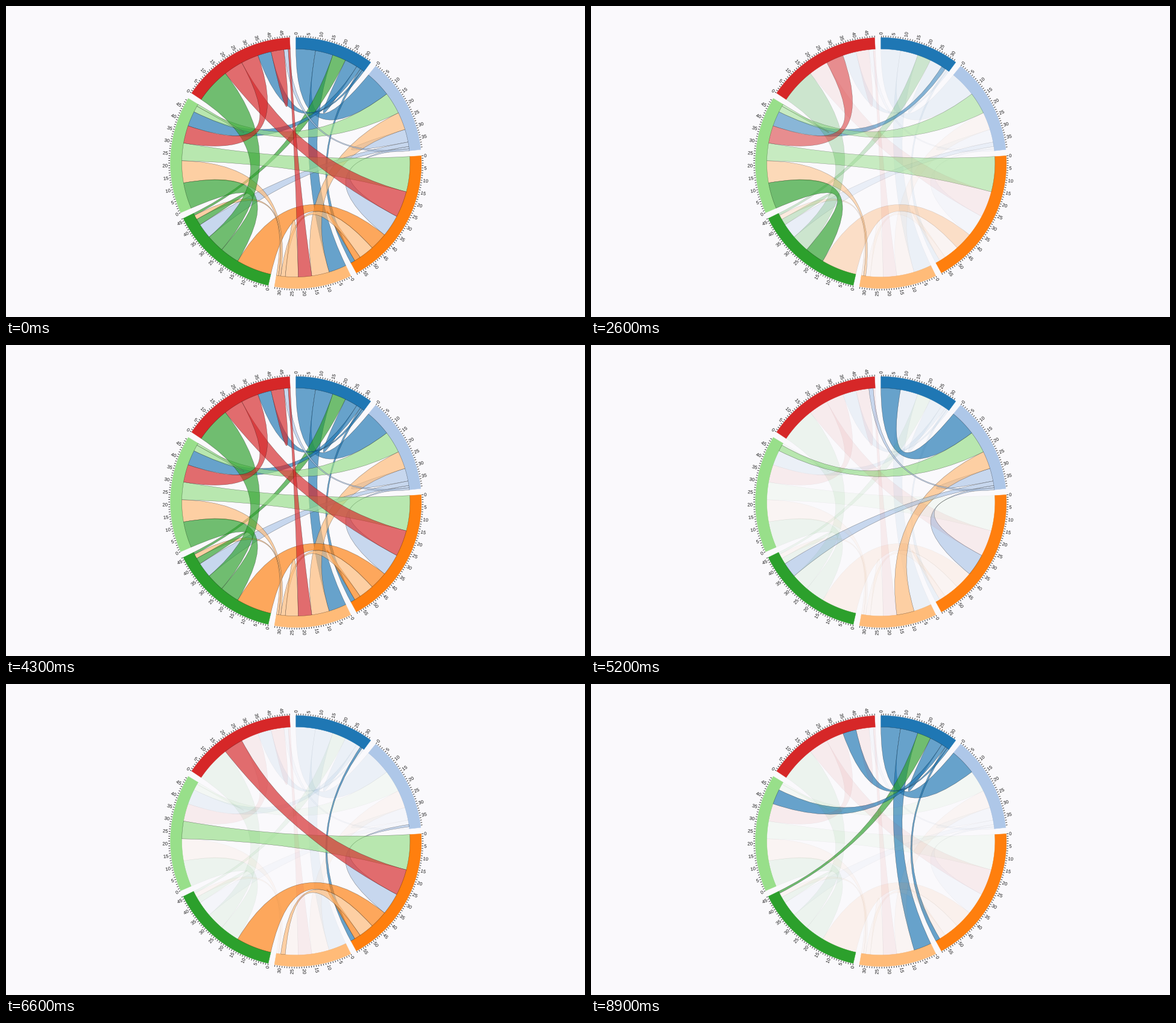
These frames come from a looping animation (960x516 px, 9000 ms). A matplotlib script:

```python
import numpy as np
import matplotlib.pyplot as plt
from matplotlib.animation import FuncAnimation
from matplotlib.collections import LineCollection
from matplotlib.colors import to_rgba
from matplotlib.patches import PathPatch, Polygon
from matplotlib.path import Path
from matplotlib.textpath import TextPath
from matplotlib.transforms import Affine2D

WIDTH, HEIGHT, DPI = 960, 516, 100
PX = 72 / DPI
CENTER = np.array([480.7, 260.5])
INNER = 189.2
OUTER = INNER * 1.1
PADDING = np.degrees(0.05)
FRAMES, INTERVAL = 90, 100
FADED, FADE_MS = 0.1, 250
FONT_SIZE = 7.8
BACKGROUND = "#faf9fc"

COLORS = ["#1f77b4", "#aec7e8", "#ff7f0e", "#ffbb78",
          "#2ca02c", "#98df8a", "#d62728"]

# Flow from each group (row) to each group (column), in thousands.
FLOWS = np.array([
    [5.87, 8.92, 1.01, 8.05, 6.17, 1.95, 0.99],
    [11.98, 5.87, 1.01, 8.09, 2.06, 10.05, 0.94],
    [2.06, 10.05, 2.87, 6.91, 8.09, 16.15, 11.98],
    [8.09, 8.05, 2.06, 5.87, 0.99, 1.01, 6.17],
    [1.01, 6.91, 16.15, 2.06, 2.87, 8.92, 8.09],
    [6.91, 2.87, 8.09, 10.05, 11.98, 0.99, 8.05],
    [6.17, 1.95, 8.92, 0.94, 16.15, 8.01, 5.87],
])
COUNT = len(FLOWS)
UNIT = (360 - COUNT * PADDING) / FLOWS.sum()

# (time in ms, hovered group)
HOVERS = [(350, 6), (1950, 5), (2500, 4), (3055, None), (4700, 1),
          (5640, None), (5750, 2), (6600, 1), (6900, 0)]


def polar(angle, radius):
    a = np.radians(angle)
    return CENTER + radius * np.stack([np.sin(a), -np.cos(a)], axis=-1)


def arc(start, end, radius):
    count = max(3, int(abs(end - start) * 2))
    return polar(np.linspace(start, end, count), radius)


def layout():
    """Angles of groups and of their slices, largest slice first."""
    groups, slices, angle = [], {}, 0
    for i, row in enumerate(FLOWS):
        start = angle
        for j in np.argsort(-row):
            slices[i, j] = (angle, angle + row[j] * UNIT)
            angle = slices[i, j][1]
        groups.append((start, angle))
        angle += PADDING
    return groups, slices


def ribbon(*spans):
    """Arcs joined by quadratic curves pulled to the centre."""
    first = polar(spans[0][0], INNER)
    points, codes = [first], [Path.MOVETO]
    for index, span in enumerate(spans):
        edge = arc(*span, INNER)[1:]
        points += list(edge)
        codes += [Path.LINETO] * len(edge)
        following = spans[(index + 1) % len(spans)]
        points += [CENTER, polar(following[0], INNER)]
        codes += [Path.CURVE3] * 2
    return Path(points + [first], codes + [Path.CLOSEPOLY])


def add_label(text, angle):
    """Radial text that is turned over on the left half."""
    flipped = angle > 180
    path = TextPath((0, 0), text, size=FONT_SIZE,
                    prop={"family": "Liberation Sans"})
    shift = -0.556 * FONT_SIZE * len(text) if flipped else 0
    place = (Affine2D().translate(shift, -0.35 * FONT_SIZE).scale(1, -1)
             .rotate_deg(angle + (90 if flipped else -90))
             .translate(*polar(angle, OUTER + 4.6)))
    ax.add_patch(PathPatch(place.transform_path(path), fc="#111111", lw=0))


def ease(p):
    p = np.clip(p, 0, 1)
    return 4 * p ** 3 if p < 0.5 else 1 - 4 * (1 - p) ** 3


def opacity(pair, time):
    start, origin, target = 0, 1.0, 1.0

    def value(at):
        return origin + (target - origin) * ease((at - start) / FADE_MS)

    for moment, hovered in HOVERS:
        if moment > time:
            break
        origin = value(moment)
        start = moment
        target = 1.0 if hovered is None or hovered in pair else FADED
    return value(time)


fig = plt.figure(figsize=(WIDTH / DPI, HEIGHT / DPI), dpi=DPI,
                 facecolor=BACKGROUND)
ax = fig.add_axes([0, 0, 1, 1])
ax.set_xlim(0, WIDTH)
ax.set_ylim(HEIGHT, 0)
ax.axis("off")

groups, slices = layout()

ticks = []
for (start, end), color in zip(groups, COLORS):
    band = np.concatenate([arc(start, end, OUTER), arc(end, start, INNER)])
    ax.add_patch(Polygon(band, fc=color, ec=color, lw=0.5 * PX))
    for n in range(int(np.ceil((end - start) / UNIT))):
        angle = start + n * UNIT
        ticks.append([polar(angle, OUTER + 0.6), polar(angle, OUTER + 3.4)])
        if n % 5 == 0:
            add_label(str(n), angle)
ax.add_collection(LineCollection(ticks, colors="#111111",
                                 linewidths=0.8 * PX))

# Each ribbon takes the colour of its narrower end.
chords = []
for i in range(COUNT):
    for j in range(i, COUNT):
        owner = i if FLOWS[i, j] <= FLOWS[j, i] else j
        ends = [slices[i, j]] if i == j else [slices[i, j], slices[j, i]]
        patch = ax.add_patch(PathPatch(ribbon(*ends), lw=0.45 * PX))
        chords.append(((i, j), COLORS[owner], patch))


def draw(frame):
    for pair, color, patch in chords:
        level = opacity(pair, frame * INTERVAL)
        patch.set_facecolor(to_rgba(color, 0.67 * level))
        patch.set_edgecolor((0, 0, 0, 0.5 * level))
    return [patch for _, _, patch in chords]


anim = FuncAnimation(fig, draw, frames=FRAMES, interval=INTERVAL,
                     repeat=True, repeat_delay=0)
plt.show()
```
